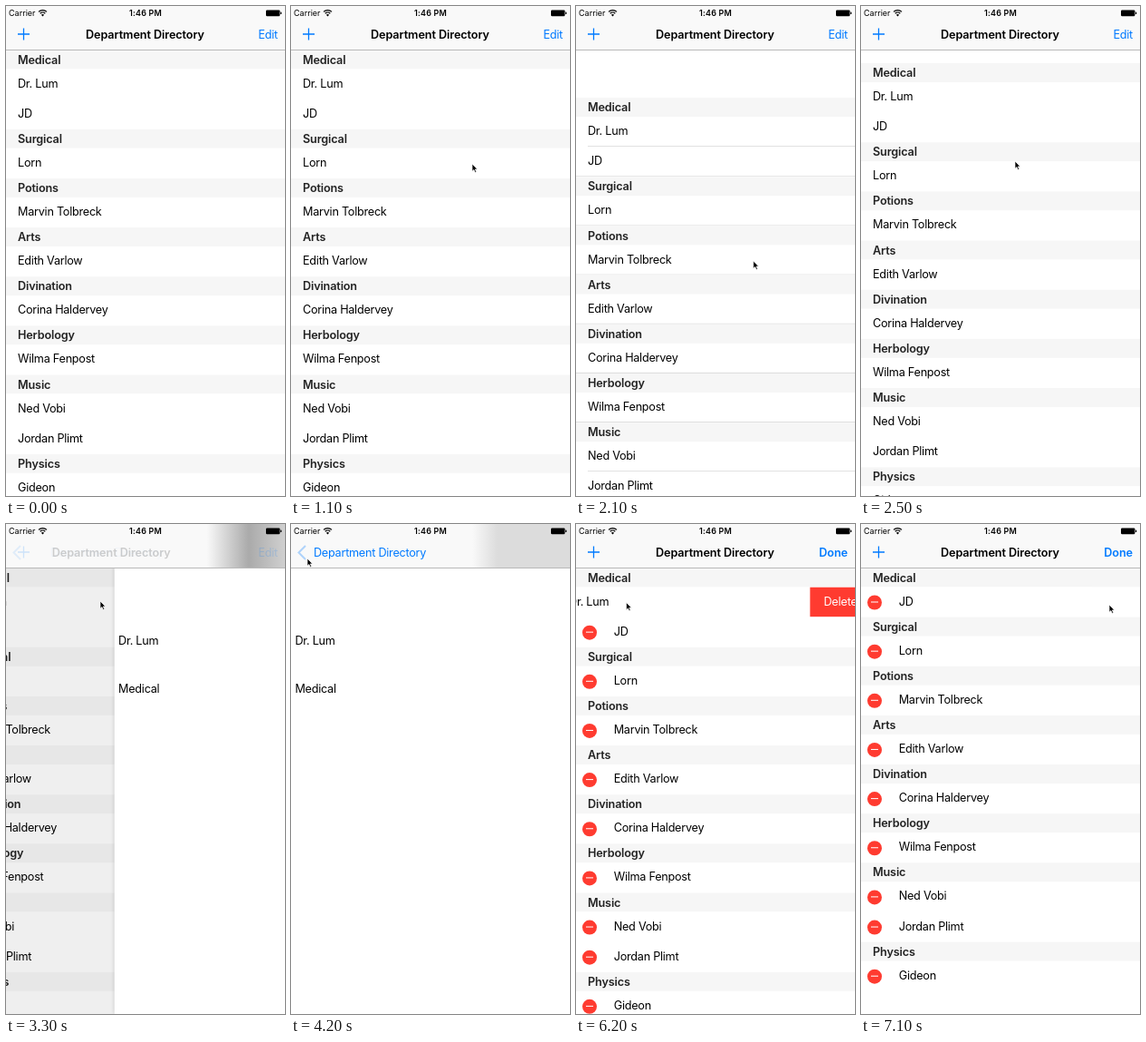
An HTML page for the animation above (7200 ms loop, 308 by 540 pixels).

```html
<!DOCTYPE html>
<html lang="en">
<head>
<meta charset="utf-8">
<title>Department Directory</title>
<style>
html, body { margin: 0; width: 308px; height: 540px; overflow: hidden; background: #fff; }
body { position: relative; font: 12.65px/1 Inter, "Liberation Sans", sans-serif; letter-spacing: -.25px; color: #000; }
div, span, svg { position: absolute; white-space: nowrap; }
#list { left: 0; top: 0; width: 308px; height: 540px; }
.head, .row { left: 0; width: 308px; box-sizing: border-box; overflow: hidden; }
.head { height: 21px; line-height: 21px; padding-left: 13px; background: #f6f6f6; color: #222; font-weight: 600; letter-spacing: -.14px; }
.row { height: 33.15px; line-height: 32.3px; background: #fff; }
.row > span { left: 13px; }
.lines .row::after { content: ""; position: absolute; left: 0; right: 0; bottom: 0; height: 1px; background: #dcdcdc; }
.lines .row:has(+ .row)::after { left: 13px; }
.minus { left: 7px; top: 8.5px; width: 16px; height: 16px; border-radius: 50%; background: #ff3b30; }
.minus::after { content: ""; position: absolute; left: 4px; top: 7.3px; width: 8px; height: 1.4px; background: #fff; }
.delete { right: 0; width: 67px; height: 100%; background: #ff3b30; color: #fff; text-align: center; }
#dim { inset: 0; background: #000; }
#detail { left: 0; top: 0; width: 308px; height: 540px; background: #fff; box-shadow: 0 0 5px rgba(0,0,0,.25); }
#nav { left: 0; top: 0; width: 308px; height: 48px; background: #f9f9f9; border-bottom: 1px solid #b9b9b9; overflow: hidden; }
#nav > span { top: 21px; line-height: 21px; }
.blue { color: #007aff; }
.bold { font-weight: 600; letter-spacing: -.08px; }
.shade { inset: 0; }
#shadeA { background: linear-gradient(90deg, transparent 72%, #aaa 87%, #d0d0d0); }
#shadeB { background: linear-gradient(90deg, transparent 65%, #dcdcdc 74%); }
#nav > .status { top: 2px; line-height: 12px; font-size: 9px; letter-spacing: 0; }
</style>
</head>
<body>
<div id="list"></div>
<div id="detail"><span style="left:4.4px;top:123px">Dr. Lum</span><span style="left:4.4px;top:175.5px">Medical</span></div>
<div id="nav">
  <div class="shade" id="shadeA"></div><div class="shade" id="shadeB"></div>
  <span class="status" style="left:3px">Carrier</span>
  <span class="status" style="left:0;width:308px;text-align:center;font-weight:600;letter-spacing:.2px">1:46 PM</span>
  <svg width="308" height="48" style="left:0;top:0" fill="none">
    <g stroke="#000" stroke-width="1.3"><path d="M36 6.4a6.4 6.4 0 0 1 9 0M37.7 8.3a4 4 0 0 1 5.6 0"/></g>
    <path d="M38.9 9.7a2.3 2.3 0 0 1 3.2 0L40.5 11.5z" fill="#000"/>
    <rect x="287" y="4.4" width="15.4" height="6.8" rx="1.2" fill="#000"/><rect x="303" y="6.5" width="1.2" height="2.6" rx=".6" fill="#000"/>
    <path id="plus" d="M13 31h13M19.5 24.5v13" stroke="#007aff" stroke-width="1.3"/>
    <path id="chevron" d="M16 24l-7.5 7.5 7.5 7.5" stroke="#007aff" stroke-width="2"/>
  </svg>
  <span id="title" class="bold" style="left:88px">Department Directory</span>
  <span id="back" class="blue" style="left:25px">Department Directory</span>
  <span id="edit" class="blue" style="right:8px">Edit</span>
  <span id="done" class="blue bold" style="right:8px">Done</span>
</div>
<svg id="cursor" width="10" height="13" style="left:0;top:0;overflow:visible">
  <path d="M0 0v8.2l1.9-1.7 1.4 2.9 1.4-.7-1.4-2.8h2.5z" fill="#000" stroke="#fff" stroke-width=".7"/>
</svg>
<script>
const LOOP = 7200, STEP = 100, W = 308, TOP = 48.5, HEAD = 21, ROW = 33.15, BUTTON = 67;
const $ = id => document.getElementById(id);
const clamp = v => Math.min(1, Math.max(0, v));
const ramp = (t, a, b) => clamp((t - a) / (b - a));
const smooth = (t, a, b) => { const u = ramp(t, a, b); return u * u * (3 - 2 * u); };
const spring = ms => { const w = Math.max(0, ms) * .0135; return w > 6 ? 1 : 1 - (1 + w) * Math.exp(-w); };
const shift = (el, x, y = 0) => el.style.transform = `translate(${x}px,${y}px)`;
const fade = (id, a) => $(id).style.opacity = clamp(a);

// Values at time t along keys of the form [time, value, ...]
function track(keys, t, ease = ramp) {
  const i = keys.findIndex(k => k[0] > t);
  if (i < 0) return keys.at(-1).slice(1);
  if (!i) return keys[0].slice(1);
  const [a, b] = [keys[i - 1], keys[i]], u = ease(t, a[0], b[0]);
  return a.slice(1).map((v, n) => v + (b[n + 1] - v) * u);
}

const pointer = [[900, 240, 120], [1100, 200, 174], [1300, 200, 174], [1700, 199.5, 261], [2000, 198, 284],
  [2150, 195, 280], [2500, 170, 171], [2900, 104, 85], [3500, 104, 85], [4000, 18, 38], [4400, 18, 38],
  [5100, 280, 38], [5400, 280, 38], [5900, 15, 86], [6100, 15, 86], [6500, 274, 89]];
const pull = [[1300, 0], [1500, 22], [1700, 44], [2000, 54], [2150, 52], [2300, 31], [2500, 14.5], [2700, 4], [2900, 0]];

const sections = {
  Medical: ["Dr. Lum", "JD"], Surgical: ["Lorn"], Potions: ["Marvin Tolbreck"], Arts: ["Edith Varlow"],
  Divination: ["Corina Haldervey"], Herbology: ["Wilma Fenpost"], Music: ["Ned Vobi", "Jordan Plimt"], Physics: ["Gideon"]
};
const list = $("list"), items = [];
function add(cls, html, height) {
  const el = document.createElement("div"), last = items.at(-1);
  el.className = cls;
  el.innerHTML = html;
  list.append(el);
  items.push({ el, y: last ? last.y + last.height : TOP, height });
  return el;
}
const rows = [];
for (const [name, people] of Object.entries(sections)) {
  add("head", name, HEAD);
  for (const p of people) rows.push(add("row", `<span>${p}</span><div class="minus"></div>`, ROW));
}
const doomed = rows[0];
doomed.insertAdjacentHTML("beforeend", '<div class="delete">Delete</div>');
list.insertAdjacentHTML("beforeend", '<div id="dim"></div>');

function draw(t) {
  const push = spring(t - 3147) - spring(t - 4210);
  const edit = smooth(t, 5200, 5520), swipe = smooth(t, 6000, 6300), gone = smooth(t, 6600, 6950);
  const [offset] = track(pull, t);

  shift(list, -.3 * W * push);
  list.className = t >= 1400 && t < 2300 ? "lines" : "";
  items.forEach(({ el, y }, i) => shift(el, 0, y + offset - (i > 1 ? ROW * gone : 0)));
  rows.forEach(el => {
    const slide = el === doomed ? BUTTON * swipe : 0, minus = el.children[1];
    shift(el.children[0], 28.7 * edit - slide);
    minus.style.transform = `translateX(${25 * (edit - 1) - slide}px) rotate(${slide / BUTTON * 90}deg)`;
    minus.style.opacity = edit ** 1.3;
  });
  shift(doomed.children[2], BUTTON * (1 - swipe));
  doomed.style.opacity = 1 - gone;
  fade("dim", .1 * push);

  $("detail").style.visibility = push > 0 ? "visible" : "hidden";
  shift($("detail"), W * (1 - push));

  shift($("title"), -61 * push);
  shift($("back"), 61 * (1 - push));
  fade("title", 1 - 1.35 * push);
  fade("back", (push - .6) / .4);
  fade("plus", 1 - 1.35 * push);
  fade("chevron", t >= 4200 ? .3 * push : (push - .57) / .43);
  fade("edit", (1 - 1.35 * push) * (1 - ramp(t, 5200, 5305)));
  fade("done", smooth(t, 5300, 5600));
  fade("shadeA", ramp(t, 3150, 3300) - ramp(t, 3300, 3700));
  fade("shadeB", ramp(t, 3300, 3600) - ramp(t, 4250, 4700));

  $("cursor").style.visibility = t >= 900 ? "visible" : "hidden";
  shift($("cursor"), ...track(pointer, t, smooth));
}

const start = performance.now();
function tick() {
  const t = (performance.now() - start) % LOOP;
  draw(Math.floor(t / STEP) * STEP);
  requestAnimationFrame(tick);
}
tick();
</script>
</body>
</html>
```
